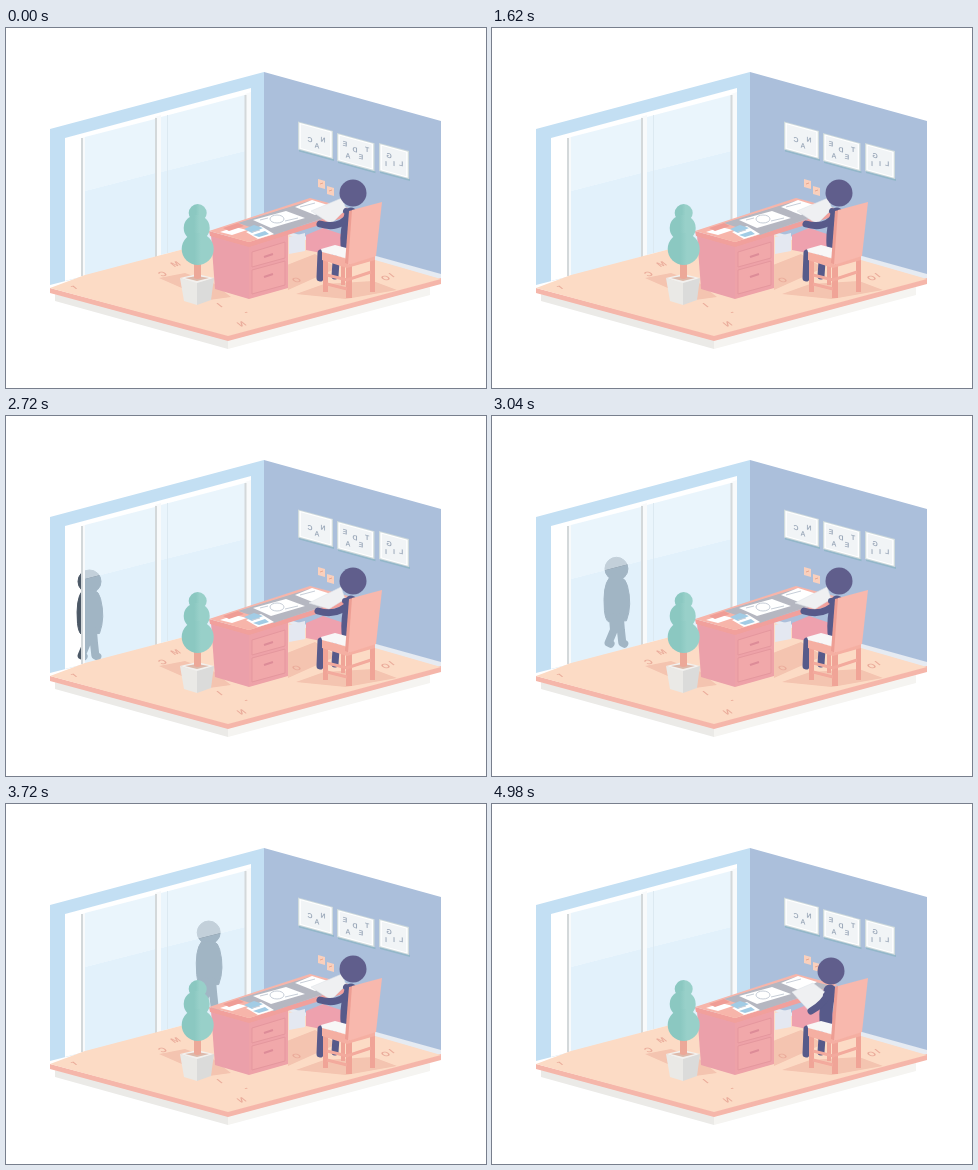
Recreate the animation shown at these times as an HTML page. Size 480 px wide and 360 px high, loop 5020 ms.

```html
<!DOCTYPE html>
<html lang="en">
<head>
<meta charset="utf-8">
<title>Study room</title>
<style>
html, body { margin: 0; width: 100%; height: 100%; overflow: hidden; background: #fff; }
svg { display: block; width: 100vw; height: 100vh; }
text { font-family: Arial, "Liberation Sans", sans-serif; font-weight: bold; text-anchor: middle; }
.limb { fill: none; stroke: #575a8a; stroke-linecap: round; stroke-linejoin: round; }
</style>
</head>
<body>
<svg viewBox="0 0 480 360">
  <defs>
    <linearGradient id="leaf"><stop offset=".4" stop-color="#8bc8c1"/><stop offset=".6" stop-color="#98d0c9"/></linearGradient>
    <clipPath id="opening"><path d="M60 111 240 65V210L60 253Z"/></clipPath>
  </defs>

  <!-- Base and walls -->
  <path fill="#ebeae7" d="M49 266 222 311V321L49 273Z"/>
  <path fill="#f5f4f1" d="M222 311 424 258V267L222 321Z"/>
  <path fill="#c3dff3" d="M44 101 258 44V202L44 257Z"/>
  <path fill="#abbfdb" d="M258 44 435 93V252L258 202Z"/>
  <path fill="#e6ebf2" d="M258 197 435 246V252L258 203Z"/>

  <!-- Window and passer-by -->
  <path fill="#fff" d="M59 110 245 60V206L59 253Z"/>
  <g clip-path="url(#opening)">
    <g id="walker" fill="#4c5866" stroke="#4c5866">
      <circle r="11.5"/>
      <path d="M-7 9Q-14 17-12 42Q-11 51-8 53L10 52Q16 36 11 17Q9 10 5 9Z"/>
      <path id="walkerLegs" fill="none" stroke-width="8" stroke-linecap="round" stroke-linejoin="round"/>
    </g>
  </g>
  <g fill="#e5f2fc" fill-opacity=".78">
    <path d="M79 109 149 91V145L79 163Z"/><path d="M155 89 239 67V123L155 144Z"/>
  </g>
  <g fill="#d2e9f9" fill-opacity=".64">
    <path d="M79 163 149 145V229L79 248Z"/><path d="M155 144 239 123V206L155 227Z"/>
  </g>
  <path fill="#f8fafb" d="M149 89 155 87V228L149 230ZM239 66 245 64V206L239 208ZM75 110 79 109V248L75 249Z"/>
  <path fill="none" stroke="#d3d8da" stroke-width="2" d="M76 110V248M150 90V229M239.5 67V206"/>
  <path fill="none" stroke="#dce9f1" d="M161.5 87V225"/>

  <!-- Floor -->
  <path fill="#f5b6aa" d="M44 260 222 307 435 250V256L222 313 44 265Z"/>
  <path fill="#fcdbc5" d="M44 260 79 247 258 200 435 251 222 308Z"/>
  <path fill="#f4c4b0" d="M153 250 179 245 207 255 225 269 203 272ZM281 237 309 226 331 240 282 262ZM290 266 318 256 367 253 391 262 340 271Z"/>
  <g id="floorLetters" fill="#eaac9b"></g>

  <!-- Wall charts and notes -->
  <g id="charts"></g>
  <path fill="#fad0bd" d="M312 151 319 153V161L312 159ZM321 158 328 160V168L321 166Z"/>
  <path stroke="#e9a78e" d="M314 156 317 155M323 163 326 162"/>

  <!-- Desk -->
  <path fill="#eea1ae" d="M300 207 317 200 341 208V230L300 222Z"/>
  <path fill="#e4e8f1" d="M283 209 299 205V223L283 226Z"/>
  <path fill="#eba0aa" d="M205 207 243 218V271L209 261Z"/>
  <path fill="#eea2a8" d="M243 217 282 205V260L243 271Z"/>
  <path fill="#f1a8aa" stroke="#e5979e" d="M246 224 279 214V230L246 239ZM246 242 279 233V257L246 266Z"/>
  <path fill="none" stroke="#dd8c98" stroke-width="2" d="M258 229 267 226M258 249 267 246"/>
  <path fill="#f1a09c" d="M203 203 243 214 346 182V187L243 219 204 208Z"/>
  <path fill="#f7b5aa" d="M203 203 304 170 346 181 243 214Z"/>
  <path fill="#b5b7c1" d="M232 195 303 173 340 182 268 207Z"/>
  <path fill="#fff" d="M247 192 280 183 299 190 265 200ZM289 179 306 172 325 178 309 187ZM240 204 255 198 268 206 252 211ZM214 204 229 199 241 202 226 207Z"/>
  <path fill="#a2cce5" d="M238 201 248 197 257 200 246 205ZM247 207 259 203 263 206 253 209Z"/>
  <path fill="#ef9d96" d="M217 200 232 195 238 198 223 203Z"/>
  <path fill="none" stroke="#c7ced8" d="M254 192 262 190M279 193 292 190M294 179 309 175M246 204 254 202"/>
  <ellipse cx="271" cy="191" rx="7" ry="4" fill="none" stroke="#c7ced8"/>

  <!-- Plant -->
  <path fill="#eca898" d="M188 230H195V252H188Z"/>
  <g fill="url(#leaf)" transform="translate(.7)">
    <circle cx="191" cy="185" r="9"/><circle cx="190" cy="200" r="13"/><circle cx="191" cy="221" r="16"/>
  </g>
  <path fill="#f2f1ef" d="M174 250 191 246 208 250 191 256Z"/>
  <path fill="#ddb9aa" d="M179 250 191 248 203 250 191 253Z"/>
  <path fill="#eae9e6" d="M174 250 191 255V277L178 273Z"/>
  <path fill="#dbdbda" d="M191 255 208 250 205 272 191 277Z"/>
  <path fill="#eca898" d="M188 239H195V250Q191 252 188 250Z"/>

  <!-- Reader -->
  <path class="limb" stroke-width="7" d="M333 224 315 225 314 250M330 234 329 248"/>
  <path id="torso" class="limb" stroke-width="13"/>
  <path id="paper" fill="#eff0f2" stroke="#dfe4e9" stroke-width=".6"/>
  <path id="farArm" class="limb" stroke-width="6"/>
  <path id="nearArm" class="limb" stroke-width="7"/>
  <circle id="head" r="13.5" fill="#605e8c"/>

  <!-- Chair -->
  <path fill="#f0a497" d="M317 226H322V264H317ZM340 232H346V270H340ZM364 224H369V264H364ZM335 235H339V257H335Z"/>
  <path fill="none" stroke="#f3aa9d" stroke-width="3" d="M321 247 341 252 365 244M321 256 341 261"/>
  <path fill="#f5afa2" d="M316 223 341 231 369 223V232L341 240 316 232Z"/>
  <path fill="#f8f7f7" d="M315 221 329 217 348 222 343 231 316 224Z"/>
  <path fill="#ed9e94" d="M343 183 347 182 344 237 339 235Z"/>
  <path fill="#f8b8ad" d="M346 182 376 174 370 228 342 237Z"/>
</svg>
<script>
const LOOP = 5020;
const get = id => document.getElementById(id);

// Lettering is mirrored: the first matrix entry flips it horizontally.
const lettering = (letters, matrix, size) => letters.map(([x, y, char]) =>
  `<text font-size="${size}" transform="matrix(${matrix},${x},${y})">${char}</text>`).join("");

const chart = (x, y, width, letters) => {
  const drop = width * .27;
  const frame = (inset, fill) => `<path fill="${fill}" d="M${x + inset} ${y + inset}L${x + width - inset} ${
    y + drop + inset / 2}V${y + drop + 28 - inset}L${x + inset} ${y + 28 - inset / 2}Z"/>`;
  return `<path fill="#93b7c9" d="M${x + 1} ${y + 28}l${width} ${drop}v2l${-width} ${-drop}Z"/>` +
    frame(0, "#d0dbdc") + frame(1.3, "#fff") + frame(2.8, "#f1f4f6") +
    `<g fill="#9daabb">${lettering(letters, "-1,-.27,0,1", 7)}</g>`;
};

get("charts").innerHTML =
  chart(292, 93.5, 35, [[304, 114, "C"], [311, 120, "A"], [317, 114, "N"]]) +
  chart(331, 105, 37.5, [[339, 118, "E"], [349, 124, "D"], [361, 124, "T"], [342, 130, "A"], [355, 131, "E"]]) +
  chart(373, 115, 30, [[383, 130, "G"], [380, 138, "I"], [388, 138, "I"], [395, 138, "L"]]);

get("floorLetters").innerHTML = lettering([
  [70, 261, "r"], [159, 248, "C"], [172, 238, "M"], [216, 279, "I"], [238, 298, "N"],
  [242, 286, "-"], [293, 254, "O"], [382, 252, "O"], [388, 249, "I"]
], "-1,.28,.8,.65", 9);

// Keyframes are [time, values]; smooth tracks ease between them.
function sample(keys, time, smooth) {
  const next = keys.findIndex(key => key[0] > time);
  if (next === 0) return keys[0][1];
  if (next < 0) return keys[keys.length - 1][1];
  const [start, from] = keys[next - 1], [end, to] = keys[next];
  let p = (time - start) / (end - start);
  if (smooth) p = p * p * (3 - 2 * p);
  return from.map((v, i) => v + (to[i] - v) * p);
}

const walkerTrack = [
  [2320, [36]], [2720, [86]], [3040, [127]], [3720, [205]], [3960, [232]], [4460, [232]], [4980, [292]]
];

// Head, shoulder, elbow, hand, hip x, then the four corners of the paper.
const resting = [347, 165, 345, 186, 334, 202, 314, 196, 341, 305, 183, 336, 170, 340, 181, 325, 196];
const reading = [347, 165, 345, 186, 332, 201, 312, 195, 342, 303, 187, 335, 171, 339, 183, 323, 193];
const leaning = [339, 167, 338, 187, 332, 200, 319, 207, 334, 300, 188, 321, 179, 334, 189, 319, 209];
const readerTrack = [
  [500, resting], [900, reading], [1100, reading], [1580, resting], [2320, resting], [2680, reading],
  [3120, reading], [3640, resting], [4460, resting], [4980, leaning]
];

function drawWalker(time) {
  const [x] = sample(walkerTrack, time);
  const swing = 7 * Math.cos((time - 3040) / 640 * 2 * Math.PI);
  get("walker").setAttribute("transform", `translate(${x},${152 - .31 * (x - 127)})`);
  get("walkerLegs").setAttribute("d", [swing, -swing].map(s =>
    `M${s * .5} 49L${s * .5 + 1} 61L${s - 1} 74l2 1`).join(""));
}

function drawReader(time) {
  const [hx, hy, sx, sy, ex, ey, ax, ay, hip, ...paper] = sample(readerTrack, time, true);
  get("head").setAttribute("transform", `translate(${hx},${hy})`);
  get("torso").setAttribute("d", `M${sx} ${sy}Q${hip - 1} 203 ${hip} 217`);
  get("farArm").setAttribute("d", `M${sx} ${sy - 1}L${paper[4]} ${paper[5] + 2}`);
  get("nearArm").setAttribute("d", `M${sx} ${sy}Q${ex} ${ey} ${ax} ${ay}`);
  get("paper").setAttribute("d", `M${paper.join(" ")}Z`);
}

function draw(now) {
  const elapsed = now % LOOP;
  const time = Math.max(0, Math.floor((elapsed - 20) / 40) * 40 + 20);
  drawWalker(time);
  drawReader(time);
  requestAnimationFrame(draw);
}
draw(0);
</script>
</body>
</html>
```
